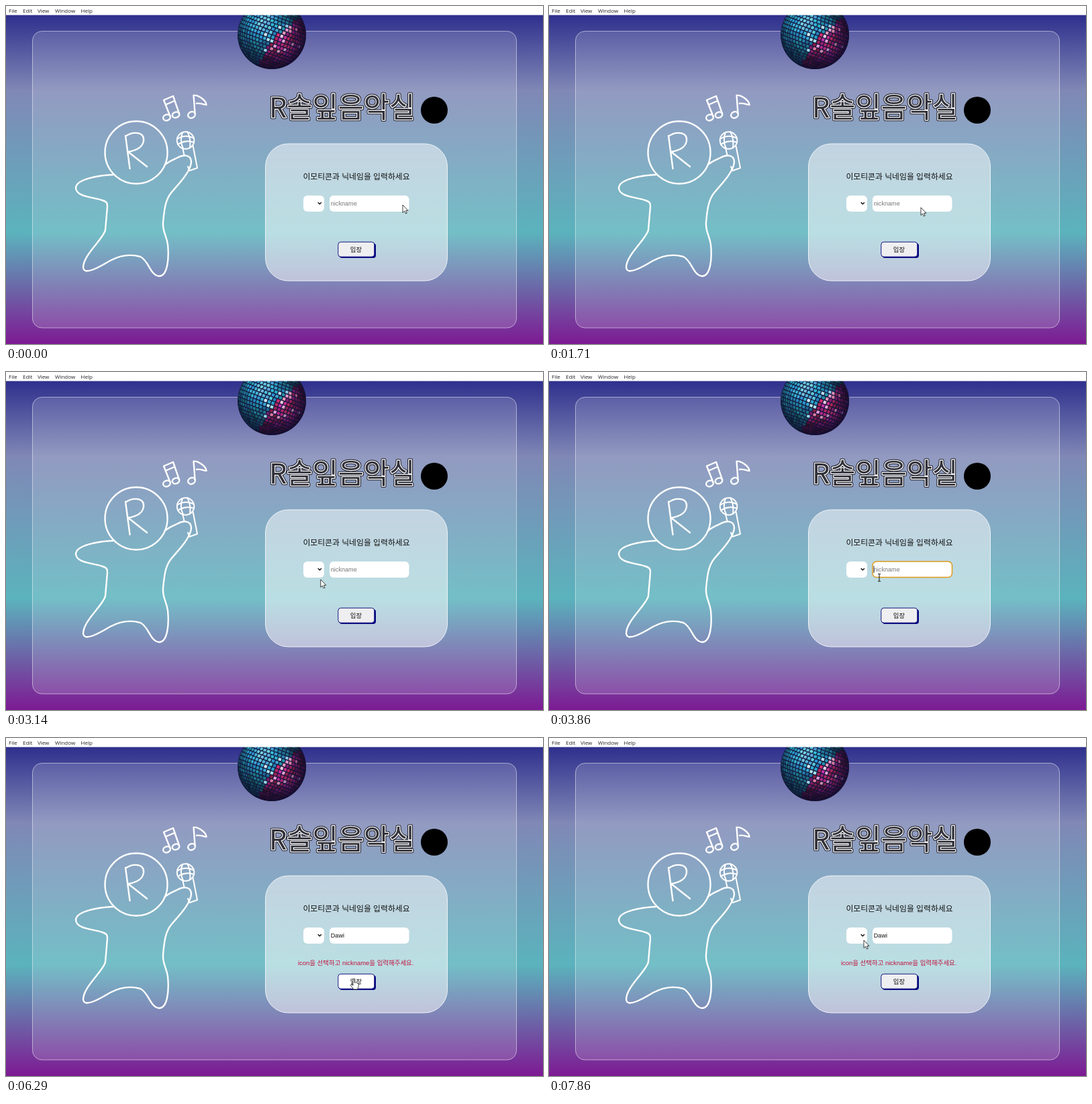
These frames come from a looping animation (800 by 503 pixels, 8 s). An HTML page:

```html
<!DOCTYPE html>
<html lang="ko">
<head>
<meta charset="utf-8">
<title>Karaoke login</title>
<style>
  html, body { margin: 0; width: 100%; height: 100%; overflow: hidden; }
  svg { display: block; width: 100vw; height: 100vh; }
  text { white-space: pre; }
  .menu { font: 8px "Open Sans", sans-serif; fill: #222; }
  .ko { font-family: "Noto Sans CJK KR", "Noto Sans CJK", sans-serif; text-anchor: middle; fill: #111; }
  .form { font: 9.1px "Liberation Sans", "Noto Sans CJK KR", sans-serif; }
  .title text { font: 300 41.5px "Noto Sans CJK KR", "Noto Sans CJK", sans-serif; stroke-linejoin: round; }
  .line { fill: none; stroke: #fff; stroke-width: 2.4; stroke-linecap: round; stroke-linejoin: round; }
</style>
</head>
<body>
<svg viewBox="0 0 800 503" preserveAspectRatio="none">
  <defs>
    <linearGradient id="sky" x2="0" y2="1">
      <stop offset="0" stop-color="#252588"/>
      <stop offset=".25" stop-color="#8088b6"/>
      <stop offset=".67" stop-color="#5bb3bd"/>
      <stop offset="1" stop-color="#7d1a93"/>
    </linearGradient>
    <radialGradient id="shade" cx=".42" cy=".4" r=".6">
      <stop offset=".55" stop-color="#0a0a28" stop-opacity="0"/>
      <stop offset="1" stop-color="#0a0a28" stop-opacity=".75"/>
    </radialGradient>
    <clipPath id="below"><path d="M0 13H800V503H0Z"/></clipPath>
  </defs>

  <rect width="800" height="503" fill="url(#sky)"/>
  <rect x="39.5" y="37.5" width="721" height="441.5" rx="14" fill="#fff" fill-opacity=".15" stroke="#fff" stroke-opacity=".5"/>

  <g clip-path="url(#below)">
    <circle cx="396" cy="43" r="51" fill="#14183a"/>
    <g id="ball"></g>
    <circle cx="396" cy="43" r="51" fill="url(#shade)"/>
  </g>

  <rect width="800" height="13.5" fill="#fff"/>
  <g class="menu">
    <text x="4" y="9.5">File</text>
    <text x="25" y="9.5">Edit</text>
    <text x="47" y="9.5">View</text>
    <text x="73" y="9.5">Window</text>
    <text x="111.5" y="9.5">Help</text>
  </g>

  <!-- Singer -->
  <g class="line">
    <circle cx="194" cy="218" r="46.5"/>
    <path d="M178 193L184.500 242M178 194C189 186 206 187 205 200C204 211 194 215 182 217L210 239"/>
    <path d="M160 251C140 252 104 257 104 271C105 284 128 284 143 289C150 291 151 293 151 298L148 333C146 346 115 370 115 389C116 402 140 388 155 379C170 371 186 369 200 373C213 379 214 400 228 402C241 402 243 375 241 355C239 341 233 336 234 322C236 300 238 288 246 278C254 268 275 248 276 232C275 219 262 222 255 226C246 230 241 232 236 237"/>
    <g stroke-width="2">
      <circle cx="267.500" cy="200" r="12.800"/>
      <path d="M255 198C262 193 272 192 280 197M256 206C263 201 273 200 280 203M263 188C260 195 260 205 264 212M270 187C274 194 275 203 274 211"/>
      <path d="M263 211L265.500 222M271 239L273.500 245L285 241L278.500 208"/>
    </g>
    <ellipse cx="239.500" cy="166" rx="5.500" ry="4.300" transform="rotate(-20 239.500 166)"/>
    <ellipse cx="253" cy="162" rx="5.300" ry="4.200" transform="rotate(-20 253 162)"/>
    <path d="M244.500 164L235 140L249 134L258 160M237.500 147L251.500 141"/>
    <ellipse cx="276.500" cy="162" rx="5.500" ry="4.500" transform="rotate(-25 276.500 162)"/>
    <path d="M281.500 160L279.500 133C286 132 298 140 298.500 147C295 147 290 144 284 145"/>
  </g>

  <g class="title" id="title"></g>
  <circle cx="638" cy="155" r="20" fill="#000"/>

  <!-- Login card -->
  <rect x="386.500" y="205" width="271" height="204" rx="34" fill="#fff" fill-opacity=".5" stroke="#fff" stroke-opacity=".8"/>
  <text class="ko" x="522" y="258" font-size="11.850">이모티콘과 닉네임을 입력하세요</text>
  <rect x="443" y="282" width="31" height="24" rx="6" fill="#fff"/>
  <path d="M464.700 292.200L467.300 294.800L469.900 292.200" fill="none" stroke="#111" stroke-width="1.400"/>
  <rect x="482" y="282" width="118.500" height="24" rx="6" fill="#fff"/>
  <rect id="ring" x="482" y="282" width="118.500" height="23.500" rx="6" fill="none" stroke="#dd9a1c" stroke-width="1.500"/>
  <text id="value" class="form" x="483.800" y="297"></text>
  <path id="caret" d="M0 288.500V299" stroke="#111" stroke-width=".9"/>
  <text id="error" class="form" x="435" y="338" style="font-size:9.450px" fill="#c0143f">icon을 선택하고 nickname을 입력해주세요.</text>
  <rect x="496.500" y="353" width="54.500" height="22" rx="4" fill="#00007d"/>
  <rect id="button" x="494.800" y="351.200" width="54" height="22" rx="4" stroke="#15157f"/>
  <text class="ko" x="521.500" y="365.700" font-size="9.400">입장</text>

  <g id="pointer">
    <path id="arrow" d="M0 0V11.500L2.600 9.100L4.500 13L6.300 12.200L4.600 8.400H8Z" fill="#fff" stroke="#111" stroke-width=".8"/>
    <path id="beam" d="M-2-5.500H-.5L0-5L.5-5.500H2M0-5V5M-2 5.500H-.5L0 5L.5 5.500H2" fill="none" stroke="#111"/>
    <path id="hand" d="M0 1Q1.200-.8 2.300 1V6Q3.500 5 4.500 6.300Q5.800 5.500 6.500 6.900Q8 6.500 8.200 8V11.500Q8 13 7 14.500V16H0V14.500L-3.300 10.500Q-4 8.500-2 8.700L0 10.200Z" fill="#fff" stroke="#111" stroke-width=".8"/>
  </g>
</svg>
<script>
const LOOP = 8000, FPS = 7;
const NAME = "Dawi", TITLE = "R솔잎음악실";
const $ = id => document.getElementById(id);

function add(parent, tag, attrs, text = "") {
  const node = document.createElementNS(parent.namespaceURI, tag);
  for (const key in attrs) node.setAttribute(key, attrs[key]);
  node.textContent = text;
  parent.append(node);
}

// Neon lettering: dark rim, white tube, dark core.
for (const [stroke, width] of [["#191923", 4.6], ["#fff", 2.6], ["none", 0]])
  add($("title"), "text", { x: 392, y: 165.5, stroke, "stroke-width": width, fill: "#32323c" }, TITLE);

// Mirror tiles on a tilted sphere.
function drawBall() {
  let seed = 17;
  const random = () => (seed = seed * 16807 % 2147483647) / 2147483647;
  const near = (x, y, cx, cy, r) => Math.exp(-((x - cx) ** 2 + (y - cy) ** 2) / (r * r));
  const tilt = 0.35, step = 0.115, gap = 0.014;
  const project = (lat, lon) => {
    const x = Math.cos(lat) * Math.sin(lon), y = Math.sin(lat);
    return [x * Math.cos(tilt) - y * Math.sin(tilt), x * Math.sin(tilt) + y * Math.cos(tilt)];
  };
  for (let lat = -1.5; lat < 1.45; lat += step) {
    const across = step / Math.max(Math.cos(lat), 0.2);
    for (let lon = -1.5; lon < 1.5; lon += across) {
      const [x, y] = project(lat + step / 2, lon + across / 2);
      const cyan = near(x, y, -0.25, -0.35, 0.6);
      const pink = near(x, y, 0.5, 0.35, 0.5);
      const glint = near(x, y, 0.35, 0.1, 0.38);
      const hue = pink > cyan ? 305 + random() * 35 : 187 + random() * 18;
      const light = 12 + 44 * cyan + 20 * pink + random() * 14 + (random() < glint * 0.55 ? 40 : 0);
      const corners = [[gap, gap], [gap, across - gap], [step - gap, across - gap], [step - gap, gap]]
        .map(([a, b]) => project(lat + a, Math.min(lon + b, 1.57)).map((v, i) => ([396, 43][i] + v * 50.5).toFixed(1)));
      add($("ball"), "polygon", {
        points: corners.join(" "),
        fill: `hsl(${hue.toFixed()} 65% ${Math.min(light, 88).toFixed()}%)`
      });
    }
  }
}

// time, x, y, pointer shape
const PATH = [
  [0, 591, 296, "arrow"], [700, 617, 293, "arrow"], [1140, 617, 293, "arrow"],
  [2200, 443, 312, "arrow"], [2700, 443, 312, "arrow"], [3280, 492, 306, "beam"],
  [5280, 492, 306, "arrow"], [5710, 517, 358, "hand"], [7140, 517, 358, "arrow"],
  [7700, 469, 301, "arrow"], [LOOP, 469, 301, "arrow"]
];
const KEYS = [4570, 4710, 5000, 5140];
const FOCUS = 3430, CLICK = 6000, HOVER = [5710, 7200];

function pointerAt(t) {
  const i = PATH.findLastIndex(p => p[0] <= t);
  const a = PATH[i], b = PATH[Math.min(i + 1, PATH.length - 1)];
  const u = (t - a[0]) / (b[0] - a[0] || 1), ease = u * u * (3 - 2 * u);
  return { x: a[1] + (b[1] - a[1]) * ease, y: a[2] + (b[2] - a[2]) * ease, shape: a[3] };
}

const show = (id, on) => $(id).setAttribute("visibility", on ? "visible" : "hidden");

function render(time) {
  const t = Math.floor(time % LOOP * FPS / 1000 + 0.001) * 1000 / FPS;
  const typed = NAME.slice(0, KEYS.filter(k => t >= k - 10).length);
  const focused = t >= FOCUS - 10 && t < CLICK - 10;
  const lastInput = KEYS.findLast(k => t >= k - 10) ?? FOCUS;

  $("value").textContent = typed || "nickname";
  $("value").setAttribute("fill", typed ? "#111" : "#777");
  const width = typed ? $("value").getComputedTextLength() : 0;
  $("caret").setAttribute("transform", `translate(${484 + width} 0)`);
  show("caret", focused && (t - lastInput + 10) % 1000 < 510);
  show("ring", focused);
  show("error", t >= CLICK - 10);
  $("button").setAttribute("fill", t >= HOVER[0] && t < HOVER[1] ? "#fff" : "#efeff1");

  const pointer = pointerAt(t);
  $("pointer").setAttribute("transform", `translate(${pointer.x} ${pointer.y})`);
  for (const id of ["arrow", "beam", "hand"]) show(id, id === pointer.shape);
}

drawBall();
const start = performance.now();
function tick() {
  render(performance.now() - start);
  requestAnimationFrame(tick);
}
tick();
</script>
</body>
</html>
```
